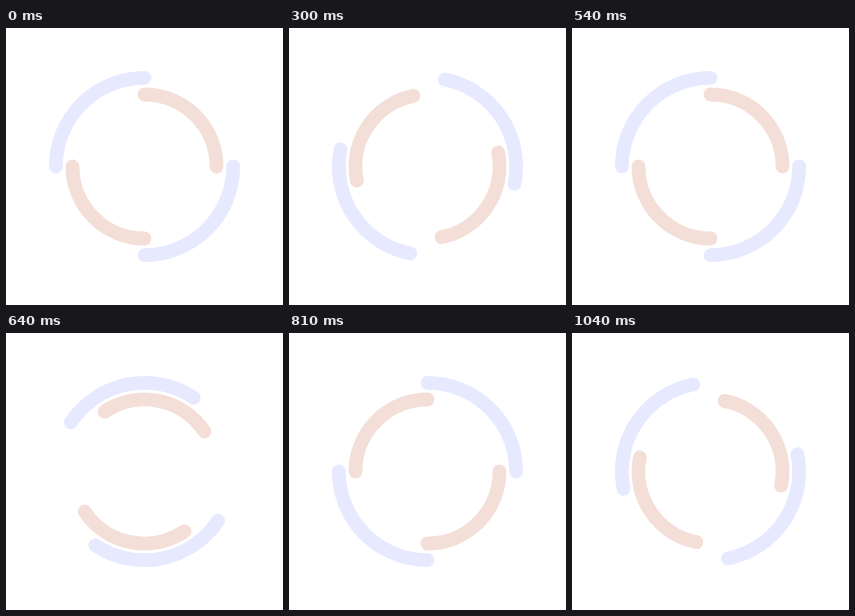
An HTML page for the animation above (1080 ms loop, 277 by 277 pixels).

```html
<!DOCTYPE html>
<html lang="en">
<head>
<meta charset="utf-8">
<title>Double ring spinner</title>
<style>
  html, body { margin: 0; height: 100%; overflow: hidden; background: #fff; }
  svg { display: block; width: 100vw; height: 100vh; }
  path { fill: none; stroke-width: 5; stroke-linecap: round; }
</style>
</head>
<body>
<svg viewBox="-50 -50 100 100">
  <path id="outer" stroke="#e7eaff" d="M-32 0A32 32 0 0 1 0-32M32 0A32 32 0 0 1 0 32"/>
  <path id="inner" stroke="#f4dfd8" d="M0-26A26 26 0 0 1 26 0M0 26A26 26 0 0 1-26 0"/>
</svg>
<script>
const LOOP = 1080, STEPS = 32;
const outer = document.getElementById('outer');
const inner = document.getElementById('inner');
const start = performance.now();

// 32 equal turns per loop, each beginning on a 10 ms tick
function stepAt(ms) {
  const tick = Math.floor(ms / 10);
  return Math.ceil((tick + 0.7) * STEPS * 10 / LOOP) - 1;
}

function draw() {
  const angle = stepAt((performance.now() - start) % LOOP) * 360 / STEPS;
  outer.setAttribute('transform', `rotate(${angle})`);
  inner.setAttribute('transform', `rotate(${-angle})`);
  requestAnimationFrame(draw);
}
draw();
</script>
</body>
</html>
```
